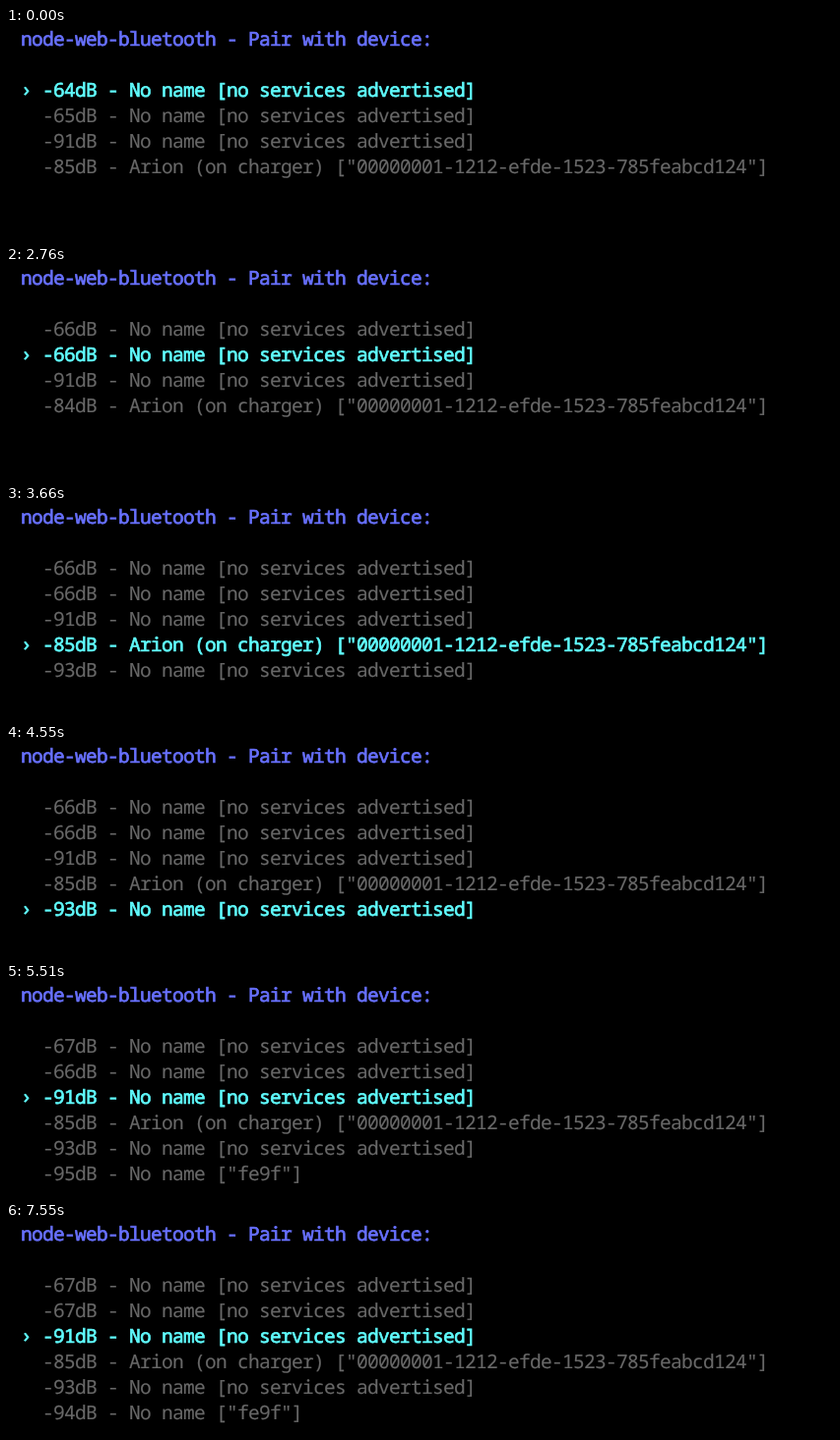
Write an HTML page that moves like this. It is 841 px wide and 215 px high and loops after 7.72 s.

```html
<!DOCTYPE html>
<html lang="en">
<head>
<meta charset="utf-8">
<title>Pair with device</title>
<style>
  html, body { margin: 0; width: 100%; height: 100%; overflow: hidden; background: #000; }
  svg { display: block; }
  text {
    font: 19.5px "Noto Sans Mono", "DejaVu Sans Mono", monospace;
    letter-spacing: calc(11px - .6em);
    text-rendering: geometricPrecision;
    white-space: pre;
    fill: currentColor;
    stroke: currentColor;
    stroke-width: .15px;
    color: #686868;
  }
  .title, .selected { stroke-width: .7px; }
  .title { color: #6871ff; }
  .selected { color: #60fdff; }
</style>
</head>
<body>
<svg width="841" height="215"></svg>
<script>
const LOOP = 7720, LEFT = 15, BASELINE = 18, LINE = 26;
const unnamed = 'No name [no services advertised]';
const tracker = 'Arion (on charger) ["00000001-1212-efde-1523-785feabcd124"]';

// How many of the given moments have passed
const count = (time, ...moments) => moments.filter(at => at <= time).length;

// Signal strength in dB over time, shown once the device is found
const devices = [
  {name: unnamed, signal: t => 64 + count(t, 720, 1620, 4910)},
  {name: unnamed, signal: t => 65 + count(t, 1020, 7550)},
  {name: unnamed, signal: () => 91},
  {name: tracker, signal: t => 85 - count(t, 720, 2820, 3720, 4260, 6110, 6710) % 2},
  {name: unnamed, signal: () => 93, found: 3180},
  {name: 'No name ["fe9f"]', signal: t => 95 - count(t, 6410), found: 4610}
];

// Arrow keys: down four times, then up twice
const selectedRow = t => count(t, 2760, 3120, 3660, 4550) - count(t, 5330, 5510);

const svg = document.querySelector('svg');

function addLine(row, content = '') {
  const text = document.createElementNS(svg.namespaceURI, 'text');
  text.setAttribute('x', LEFT);
  text.setAttribute('y', BASELINE + row * LINE);
  text.textContent = content;
  return svg.appendChild(text);
}

addLine(0, 'node-web-bluetooth - Pair with device:').setAttribute('class', 'title');
const lines = devices.map((_, i) => addLine(i + 2));

function render(time) {
  const selected = selectedRow(time);
  devices.forEach(({name, signal, found = 0}, i) => {
    const active = i === selected;
    lines[i].textContent = time < found ? ''
      : `${active ? '›' : ' '} -${signal(time)}dB - ${name}`;
    lines[i].setAttribute('class', active ? 'selected' : '');
  });
}

const start = performance.now();
function tick() {
  render((performance.now() - start) % LOOP);
  requestAnimationFrame(tick);
}
tick();
</script>
</body>
</html>
```
